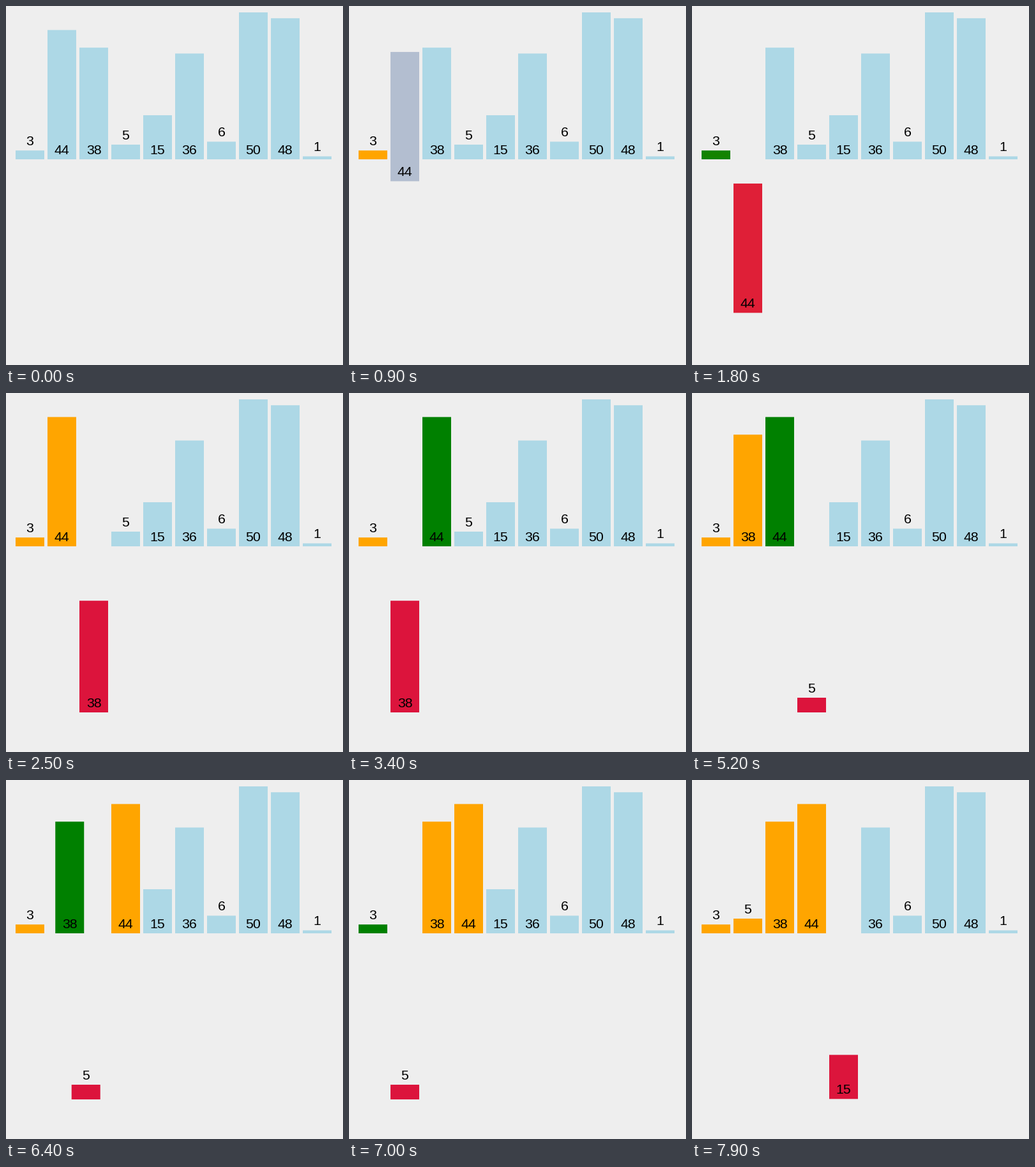
These frames come from a looping animation (528 px wide and 562 px high, 8000 ms). A matplotlib script:

```python
"""Insertion sort, shown as bars that are lifted out, compared and put back."""
import matplotlib.pyplot as plt
import numpy as np
from matplotlib.animation import FuncAnimation
from matplotlib.colors import to_rgb
from matplotlib.patches import Rectangle

WIDTH, HEIGHT, DPI = 528, 562, 64
FRAMES, INTERVAL = 80, 100

VALUES = [3, 44, 38, 5, 15, 36, 6, 50, 48, 1]
LEFT, PITCH, BAR_WIDTH = 15, 50, 45
BASE, UNIT, DROP = 240, 4.6, 260
TEXT_PX, TEXT_GAP = 21.4, 8

FIRST_STEP, STEP_GAP, TRANSITION = 363, 456.8, 250
MIN_PROGRESS = 0.05

UNSORTED, SORTED = to_rgb("lightblue"), to_rgb("orange")
PICKED, COMPARED = to_rgb("crimson"), to_rgb("green")


def sort_steps(values, sorted_count):
    """Each step maps a value to its changes: slot, drop and colour."""
    order = list(values)
    steps = [{order[0]: {"color": SORTED}}]
    for i in range(1, sorted_count):
        picked = order[i]
        steps.append({picked: {"color": PICKED, "drop": DROP}})
        j = i
        previous = None
        while j > 0:
            other = order[j - 1]
            compare = {other: {"color": COMPARED}}
            if previous is not None:
                compare[previous] = {"color": SORTED}
            steps.append(compare)
            if other <= picked:
                break
            steps.append({other: {"slot": j}, picked: {"slot": j - 1}})
            order[j - 1], order[j] = picked, other
            previous = other
            j -= 1
        steps.append({order[j - 1]: {"color": SORTED},
                      picked: {"color": SORTED, "drop": 0}})
    return steps


def ease(t):
    """Cubic in-out; the barely visible start is held still."""
    t = min(max(t, 0), 1)
    p = 4 * t ** 3 if t < 0.5 else 1 - 4 * (1 - t) ** 3
    return p if p >= MIN_PROGRESS else 0


STEPS = sort_steps(VALUES, 5)


def state_at(time):
    state = {v: {"slot": i, "drop": 0, "color": np.array(UNSORTED)}
             for i, v in enumerate(VALUES)}
    for k, step in enumerate(STEPS):
        p = ease((time - FIRST_STEP - k * STEP_GAP) / TRANSITION)
        if p == 0:
            break
        for value, changes in step.items():
            for key, goal in changes.items():
                start = state[value][key]
                state[value][key] = start + (np.array(goal) - start) * p
    return state


fig = plt.figure(figsize=(WIDTH / DPI, HEIGHT / DPI), dpi=DPI, facecolor="#eeeeee")
ax = fig.add_axes([0, 0, 1, 1])
ax.set(xlim=(0, WIDTH), ylim=(HEIGHT, 0))
ax.axis("off")

bars, labels = {}, {}
for value in VALUES:
    bars[value] = ax.add_patch(
        Rectangle((0, 0), BAR_WIDTH, value * UNIT, linewidth=0, snap=False))
    labels[value] = ax.text(0, 0, str(value), ha="center", va="baseline",
                            color="black", family="Liberation Sans",
                            fontsize=TEXT_PX * 72 / DPI)


def draw(frame):
    for value, bar in state_at(frame * INTERVAL).items():
        x = LEFT + PITCH * bar["slot"]
        bottom = BASE + bar["drop"]
        top = bottom - value * UNIT
        bars[value].set_xy((x, top))
        bars[value].set_facecolor(np.clip(bar["color"], 0, 1))
        text_base = bottom if value >= 10 else top
        labels[value].set_position((x + BAR_WIDTH / 2, text_base - TEXT_GAP))
    return [*bars.values(), *labels.values()]


animation = FuncAnimation(fig, draw, frames=FRAMES, interval=INTERVAL,
                          repeat=True, repeat_delay=0)
plt.show()
```
